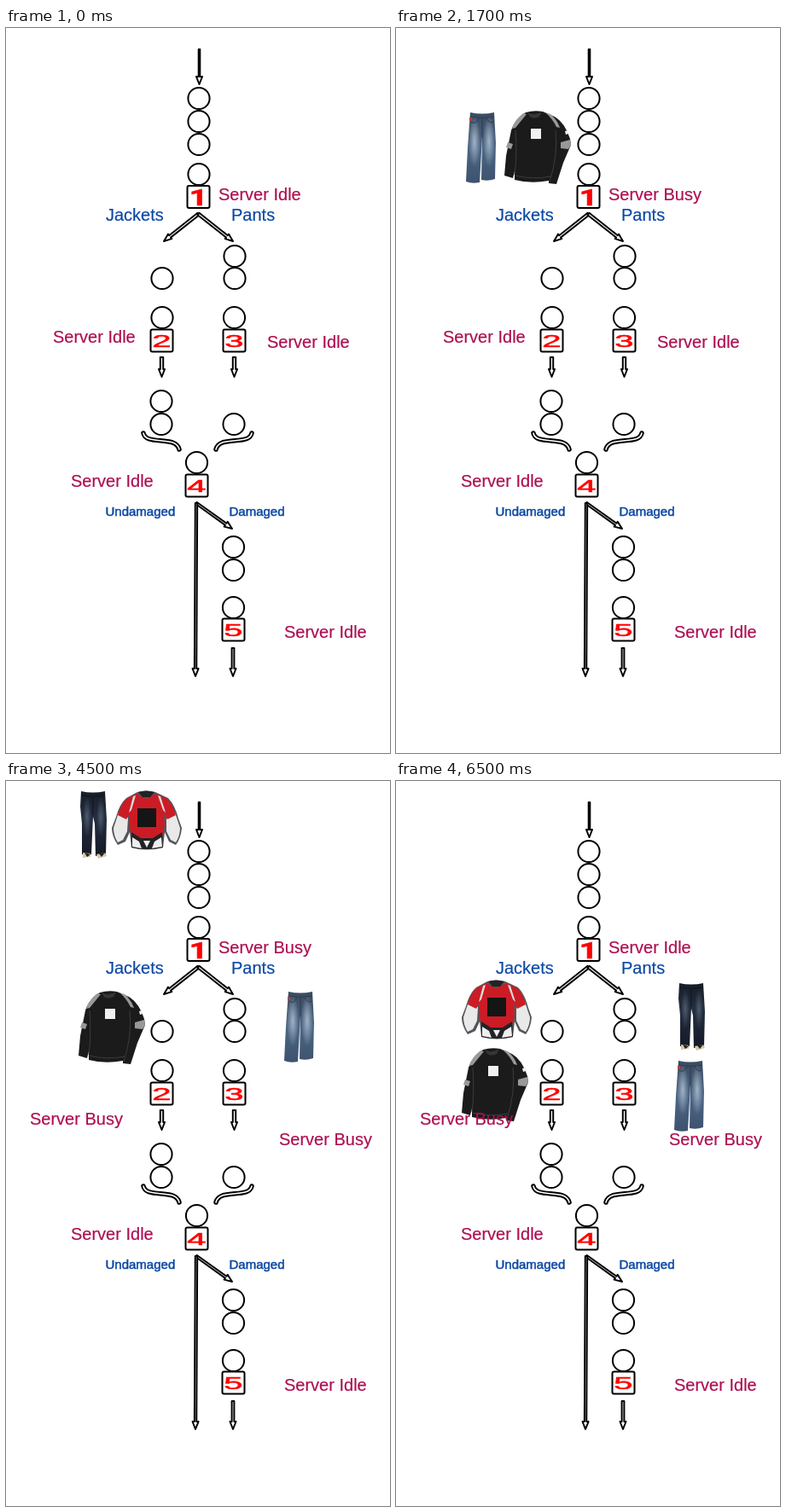
An HTML page for the animation above (8000 ms loop, 450 px wide and 850 px high).

```html
<!DOCTYPE html>
<html lang="en">
<head>
<meta charset="utf-8">
<title>Laundry queue</title>
<style>
html, body { margin: 0; width: 100%; height: 100%; overflow: hidden; background: #fff; }
svg { display: block; width: 450px; height: 850px; }
text { font: 20px "Liberation Sans", Arial, sans-serif; }
#chart { fill: #fff; stroke: #000; stroke-width: 2; stroke-linejoin: round; }
#labels { fill: #0b48a4; stroke: #0b48a4; stroke-width: .2; }
#labels .small { font-size: 15px; stroke-width: .5; }
#status { fill: #ad0f52; stroke: #ad0f52; stroke-width: .2; }
#digits { fill: #f00; stroke: #f00; stroke-width: .5; text-anchor: middle; }
#digits .bold { font: bold 25px Roboto, sans-serif; }
.pipe { fill: none; stroke-linecap: round; }
</style>
</head>
<body>
<svg viewBox="0 0 450 850">
  <defs>
    <linearGradient id="denim" x2="0" y2="1">
      <stop offset="0" stop-color="#3a4a5f"/>
      <stop offset=".5" stop-color="#4d6684"/>
      <stop offset="1" stop-color="#3d526f"/>
    </linearGradient>
    <linearGradient id="navy" x2="0" y2="1">
      <stop offset="0" stop-color="#171c28"/>
      <stop offset=".4" stop-color="#232e40"/>
      <stop offset="1" stop-color="#141926"/>
    </linearGradient>
    <radialGradient id="fade">
      <stop offset="0" stop-color="#a9bccd" stop-opacity=".9"/>
      <stop offset="1" stop-color="#a9bccd" stop-opacity="0"/>
    </radialGradient>
  </defs>

  <g id="clothes">
    <g id="jeans">
      <path fill="url(#denim)" d="M87 99Q101 102 115 99L117 135 116 177Q108 180 100 178L101 128 98 181Q89 183 82 180L84 140Z"/>
      <g fill="url(#fade)">
        <ellipse cx="92" cy="133" rx="7" ry="30"/>
        <ellipse cx="109" cy="133" rx="7" ry="30"/>
      </g>
      <path fill="none" stroke="#2c3c52" d="M87 104Q101 107 115 104M101 105V128M88 110Q93 114 97 106M106 106Q110 113 115 110"/>
      <path fill="#b5403a" d="M86 105h3v4h-3z"/>
    </g>
    <g id="darkJeans">
      <path fill="url(#navy)" d="M88 12Q102 15 116 12L118 45 117 86 105 88 104 50 102 42 100 86 89 86 89 50 87 30Z"/>
      <g fill="url(#fade)" opacity=".35">
        <ellipse cx="95" cy="42" rx="5" ry="24"/>
        <ellipse cx="111" cy="42" rx="5" ry="24"/>
      </g>
      <path fill="none" stroke="#10151f" d="M88 17Q102 20 116 17M102 18V40"/>
      <path fill="#d8c9a0" d="M90 84l9 1v4l-9 1zM106 86l10-2 2 4-10 3z"/>
      <path fill="#1b2231" d="M92 84l7 2-4 3zM109 85l7-1-4 5z"/>
    </g>
    <g id="blackJacket">
      <path fill="#1b1b1c" d="M152 99Q162 96 172 98L186 104Q198 111 204 130L205 137 196 158 188 183 179 182V179Q158 183 139 178V168L137 176 127 173 129 150 135 120Q139 107 152 99Z"/>
      <path fill="#97999b" d="M149 100l4 1-13 16-4 1q2-9 13-18zM175 99l6 2q8 7 11 16l-4-1q-4-9-13-17zM131 134l6 2-2 6-6-2zM193 134l11-3 1 6-3 5-9-1z"/>
      <path fill="#363637" d="M154 99q8 5 17-1l-3 6q-6 3-11 0z"/>
      <path fill="none" stroke="#3c3c3e" d="M140 120Q142 150 139 172M187 120Q190 150 180 180M140 173Q160 178 181 174"/>
      <path fill="#f0f0f0" d="M158 118h12v12h-12zM198 121l3-1 1 4-3 1z"/>
    </g>
    <g id="redJacket">
      <path fill="#54565a" d="M154 13Q164 10 175 13L190 20Q198 28 202 44L206 55Q205 67 199 75L191 71 186 60 184 78Q165 83 147 78L145 60 140 71 131 75Q124 65 124 55L129 42Q133 27 141 20Z"/>
      <path fill="#e9e9ea" d="M132 37l11 6-1 16-5 10-6 3q-5-8-5-17zM198 37l-10 6v16l5 10 6 3q5-8 5-17z"/>
      <path fill="#cb1c25" d="M153 15L164 21 176 15 189 21Q196 28 199 40L189 45 185 38 186 52 183 65 165 72 148 65 144 52 145 38 141 45 131 40Q134 28 141 21Z"/>
      <path fill="#dcdcdd" d="M149 18l3-1-5 17-3 3zM181 18l-3-1 6 17 3 3z"/>
      <path fill="#222326" d="M147 60l11 7h14l11-7 1 18q-19 4-37 0zM155 13q9-3 19 0l-5 6h-9z"/>
      <path fill="#eee" d="M148 66l8 5 3 8-11-2zM182 66l-8 5-3 8 12-2zM161 70h8l-4 8z"/>
      <path fill="#151516" d="M154 32h22v22h-22z"/>
    </g>
  </g>

  <g id="chart"></g>

  <g id="labels">
    <text x="117" y="226">Jackets</text>
    <text x="264" y="226">Pants</text>
    <text class="small" x="116.500" y="572">Undamaged</text>
    <text class="small" x="261.500" y="572">Damaged</text>
  </g>
  <g id="digits"></g>
  <g id="status"></g>
</svg>
<script>
const $ = id => document.getElementById(id);

function add(parent, tag, attrs, text) {
  const el = document.createElementNS("http://www.w3.org/2000/svg", tag);
  for (const k in attrs) el.setAttribute(k, attrs[k]);
  if (text) el.textContent = text;
  return $(parent).appendChild(el);
}

// Hollow arrow from (x, y) to (x2, y2) with half shaft width w
function arrow(x, y, x2, y2, w) {
  const len = Math.hypot(x2 - x, y2 - y), neck = len - 9;
  const turn = Math.atan2(y2 - y, x2 - x) * 180 / Math.PI;
  add("chart", "path", {
    d: `M0 ${-w}H${neck}V-3.500L${len} 0L${neck} 3.500V${w}H0Z`,
    transform: `translate(${x} ${y}) rotate(${turn})`
  });
}

function pipe(d) {
  add("chart", "path", { d, class: "pipe", stroke: "#000", "stroke-width": 5.5 });
  add("chart", "path", { d, class: "pipe", stroke: "#fff", "stroke-width": 1.6 });
}

arrow(226.5, 25, 226.5, 66, 0.8);
arrow(225.5, 218, 185, 250, 1.5);
arrow(225.5, 218, 266, 250, 1.5);
arrow(182.5, 386, 182.5, 409, 1.7);
arrow(267.5, 386, 267.5, 409, 1.7);
arrow(223, 557, 265, 587, 1.3);
arrow(223, 557, 222, 760, 1.2);
arrow(266, 727, 266, 760, 1.4);
pipe("M161 475C164 490 199 477 203 494");
pipe("M288 475C285 490 250 477 246 494");

const queues = [
  [226, 82, 109, 136, 171], [183, 293, 339], [268, 267, 293], [267.5, 339],
  [182, 437, 464], [267, 464], [223.5, 509], [266.5, 608, 635, 679]
];
for (const [cx, ...ys] of queues)
  for (const cy of ys) add("chart", "circle", { cx, cy: cy + 0.5, r: 12.6 });

const servers = [[225.5, 198], [182.5, 366.5], [267.5, 366.5], [223.5, 536.5], [266.5, 705.5]];
servers.forEach(([x, y], i) => {
  add("chart", "rect", { x: x - 13, y: y - 13, width: 26, height: 26, rx: 2 });
  const [sx, drop] = i ? [2, 7.5] : [1.5, 9.5];
  add("digits", "text", {
    transform: `translate(${x} ${y + drop}) scale(${sx} 1)`, class: i ? "" : "bold"
  }, i + 1);
});

// Idle and busy label positions
const idleAt = [[249, 202], [55, 369], [306, 375], [76, 538], [326, 715]];
const busyAt = [[249, 202], [28, 403], [320, 427]];
const labels = idleAt.map(() => add("status", "text", {}));

// Each step: start time, busy servers, shift of every visible garment
const steps = [
  [0, [], {}],
  [500, [0], { jeans: [0, 0], blackJacket: [0, 0] }],
  [2500, [0], { jeans: [0, 0], blackJacket: [0, 0], darkJeans: [0, 0], redJacket: [0, 0] }],
  [4500, [0, 1, 2], { jeans: [244, 148], blackJacket: [-42, 149], darkJeans: [0, 0], redJacket: [0, 0] }],
  [6500, [1, 2], { jeans: [244, 229], blackJacket: [-50, 216], darkJeans: [244, 225], redJacket: [-47, 222] }]
];

function show([, busy, shifts]) {
  for (const item of $("clothes").children) {
    const shift = shifts[item.id];
    item.style.display = shift ? "" : "none";
    if (shift) item.setAttribute("transform", `translate(${shift})`);
  }
  labels.forEach((label, i) => {
    const on = busy.includes(i), [x, y] = (on ? busyAt : idleAt)[i];
    label.textContent = on ? "Server Busy" : "Server Idle";
    label.setAttribute("x", x);
    label.setAttribute("y", y);
  });
}

let current;
function tick() {
  const t = performance.now() % 8000;
  const step = steps.filter(s => s[0] <= t).pop();
  if (step !== current) show(current = step);
  requestAnimationFrame(tick);
}
tick();
</script>
</body>
</html>
```
